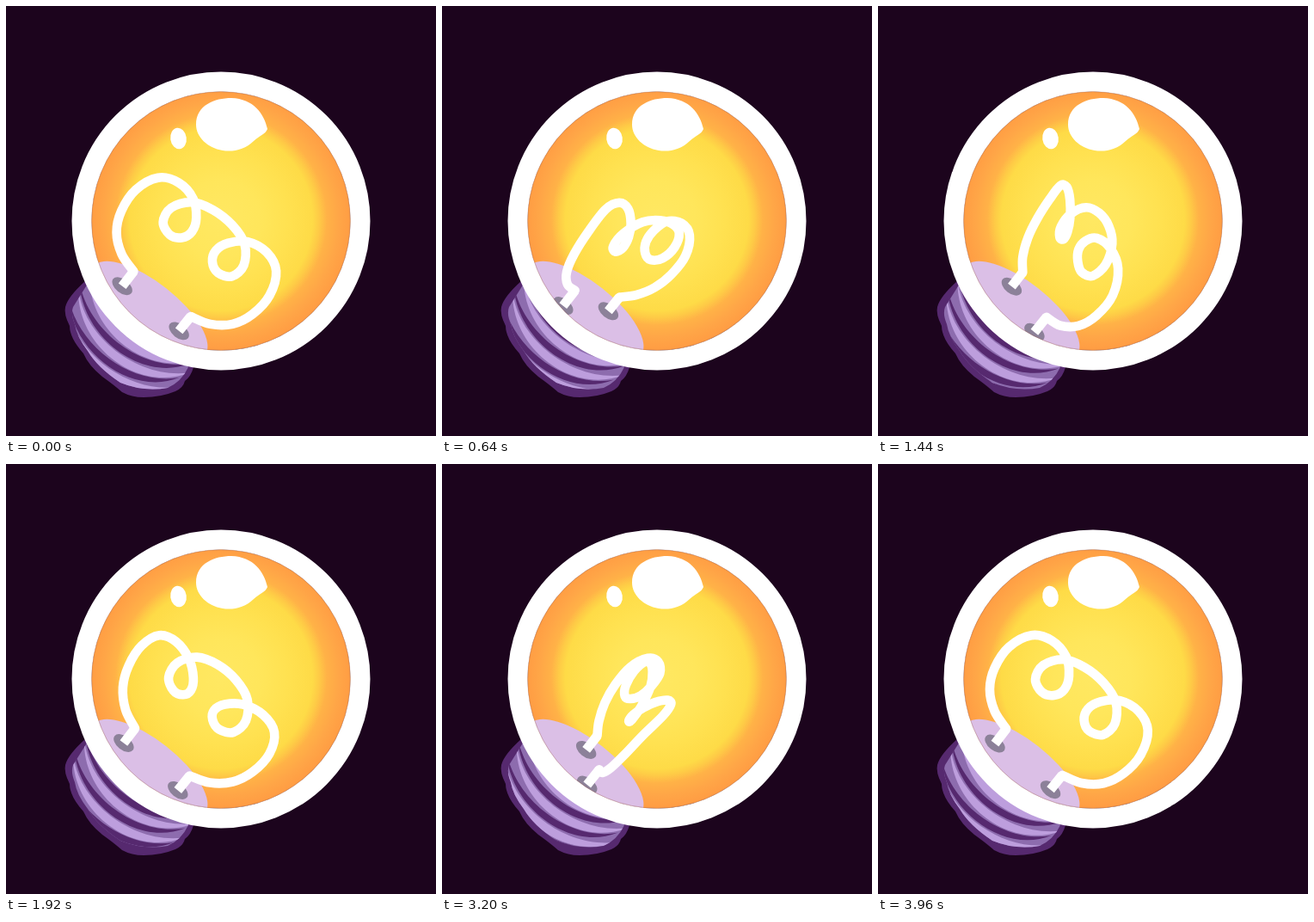
Recreate the animation shown at these times as an HTML page. Size 500 by 500 pixels, loop 4 s.

```html
<!DOCTYPE html>
<html lang="en">
<head>
<meta charset="utf-8">
<title>Light bulb</title>
<style>
  html, body { margin: 0; width: 100%; height: 100%; overflow: hidden; background: #1c041d; }
  svg { display: block; width: 100%; height: 100%; }
</style>
</head>
<body>
<svg viewBox="0 0 500 500">
  <defs>
    <radialGradient id="glow" gradientUnits="userSpaceOnUse" cx="250" cy="248" r="152">
      <stop offset="0" stop-color="#ffe862"/>
      <stop offset=".3" stop-color="#ffe65b"/>
      <stop offset=".52" stop-color="#ffe150"/>
      <stop offset=".7" stop-color="#fedb47"/>
      <stop offset=".75" stop-color="#fecb46"/>
      <stop offset=".81" stop-color="#ffb247"/>
      <stop offset=".9" stop-color="#ffa647"/>
      <stop offset="1" stop-color="#ff9c43"/>
    </radialGradient>
    <clipPath id="glass"><circle cx="250" cy="250" r="151"/></clipPath>
    <clipPath id="screw">
      <path d="M98 318L78 350Q75 358 80 370Q82 384 95 401Q106 420 133 438Q160 449 188 444Q204 437 212 420L170 340Z"/>
    </clipPath>
  </defs>

  <path fill="#56296f" d="M92 320Q72 338 69 350Q67 358 74 372Q74 386 90 404Q96 418 112 431Q126 441 135 449Q146 455 160 455Q180 455 197 448Q206 444 208 436Q215 431 218 420L170 340Z"/>
  <g clip-path="url(#screw)">
    <!-- Local x runs across the bulb, y down its axis -->
    <g transform="translate(168 352) rotate(38.3)">
      <rect x="-95" width="190" height="115" fill="#8d6cae"/>
      <g id="threads"></g>
    </g>
  </g>

  <g clip-path="url(#glass)">
    <circle cx="250" cy="250" r="151" fill="url(#glow)"/>
    <g transform="translate(168 352) rotate(38.3)">
      <ellipse cy="3" rx="83" ry="33" fill="#dbbfe6"/>
      <g fill="#8c8199">
        <ellipse class="socket" rx="13.5" ry="8"/>
        <ellipse class="socket" rx="13.5" ry="8"/>
      </g>
      <g fill="none" stroke="#fff">
        <path id="posts" stroke-width="11"/>
        <path id="wire" stroke-width="10.6" stroke-linecap="round" stroke-linejoin="round"/>
      </g>
    </g>
  </g>

  <circle cx="250" cy="250" r="162" fill="none" stroke="#fff" stroke-width="23"/>
  <circle cx="250" cy="250" r="150.3" fill="none" stroke="#9a5a4c" stroke-width=".6" opacity=".6"/>
  <path fill="#fff" d="M221 138C221 115 243 107 262 107C288 108 300 125 304 143C302 149 294 151 288 157C278 167 264 170 252 168C234 165 221 152 221 138Z"/>
  <ellipse cx="200.5" cy="154" rx="9.3" ry="12.3" fill="#fff" transform="rotate(-8 200.5 154)"/>
</svg>

<script>
const PERIOD = 4000, STEP = 40;
const TILT = 0.24, RISE = Math.sqrt(1 - TILT * TILT), CAMERA = 850;
const AXIS_OFFSET = 131;          // socket disc to bulb centre, on screen
const PITCH = 21;

// Half of the filament: across, along the axis, depth. The other half mirrors it.
const FOOT = [43.7, -140, 0];
const HALF = [
  [43.7, -116, 0], [67.5, -107, -3], [87.5, -88.5, -6], [98, -63.5, -7], [99.5, -33, -5],
  [88, -7, 3], [66, 2, 10], [41, -3, 13], [24, -18, 9], [18, -33, 4], [23, -45, -2],
  [36, -50, -6], [51, -42, -9], [53.5, -22, -11], [39, -1.5, -12], [14, 7.5, -13]
];
const mirror = ([a, h, d]) => [-a, h, d];
const COIL = [...HALF, ...HALF.map(mirror).reverse()];

const $ = id => document.getElementById(id);
const sockets = document.querySelectorAll('.socket');
const pair = p => p[0].toFixed(2) + ' ' + p[1].toFixed(2);

function project([a, h, d], angle) {
  const c = Math.cos(angle), s = Math.sin(angle);
  const far = a * s + d * c;
  const scale = CAMERA / (CAMERA + far * RISE - h * TILT);
  return [(a * c - d * s) * scale, -AXIS_OFFSET - (h * RISE + far * TILT) * scale];
}

// Catmull-Rom spline as cubic Beziers
function spline(pts) {
  let path = 'M' + pair(pts[0]);
  for (let i = 0; i < pts.length - 1; i++) {
    const p = pts[i], q = pts[i + 1];
    const before = pts[i - 1] || p, after = pts[i + 2] || q;
    const out = p.map((v, k) => v + (q[k] - before[k]) / 6);
    const into = q.map((v, k) => v - (after[k] - p[k]) / 6);
    path += 'C' + [out, into, q].map(pair).join(' ');
  }
  return path;
}

// Crescent that is thick in the middle and thin at both ends
const crescent = (y, from, to, bow, thick) =>
  `M${from} ${y + 4}C${from * .5} ${y + bow + 2} ${to * .5} ${y + bow} ${to} ${y}` +
  `C${to * .6} ${y + bow + thick} ${from * .5} ${y + bow + thick + 2} ${from} ${y + 4}Z`;

function threads(turn) {
  let light = '', dark = '';
  for (let i = -2; i < 5; i++) {
    const y = (i + turn) * PITCH;
    light += crescent(y + 9, -80, 82, 43, 13);
    dark += crescent(y, -86, 76, 43, 10);
  }
  return `<path fill="#bd9edd" d="${light}"/><path fill="#56296f" d="${dark}"/>`;
}

function draw(time) {
  const turn = Math.floor(time % PERIOD / STEP) * STEP / PERIOD;
  const angle = turn * 2 * Math.PI;
  const at = p => project(p, angle);
  const feet = [FOOT, mirror(FOOT)].map(at);
  const tops = [HALF[0], mirror(HALF[0])].map(at);

  feet.forEach((foot, i) => sockets[i].setAttribute('transform', `translate(${pair(foot)})`));
  $('posts').setAttribute('d', feet.map((foot, i) => `M${pair(foot)}L${pair(tops[i])}`).join(''));
  $('wire').setAttribute('d', spline(COIL.map(at)));
  $('threads').innerHTML = threads(turn);
}

const start = performance.now();
function tick() {
  draw(performance.now() - start);
  requestAnimationFrame(tick);
}
tick();
</script>
</body>
</html>
```
